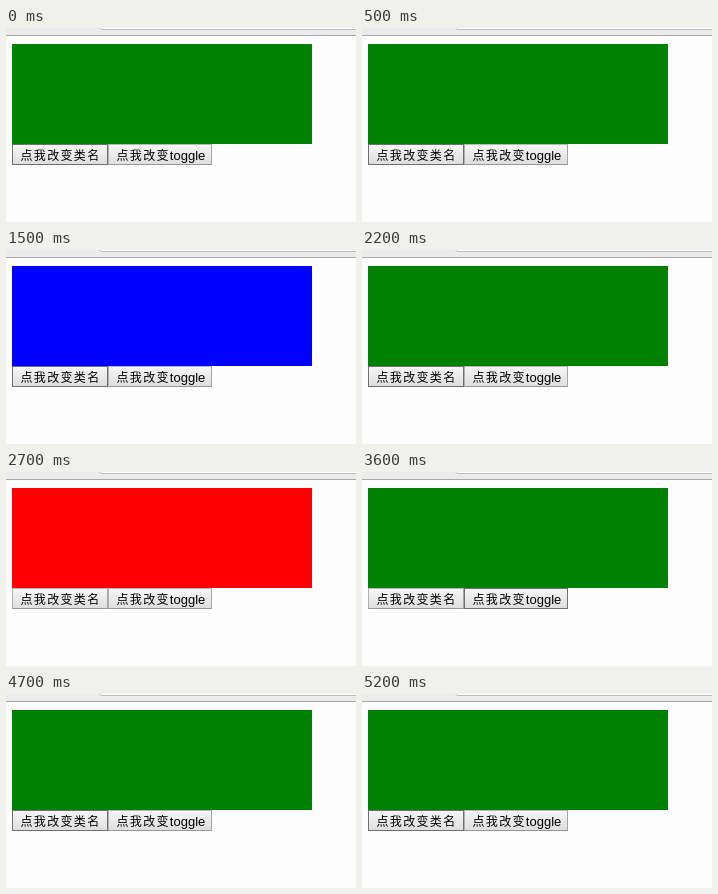
An HTML page for the animation above (5.7 s loop, 350 by 194 pixels).

```html
<!DOCTYPE html>
<html lang="zh-CN">
<head>
<meta charset="utf-8">
<title>Class toggle demo</title>
<style>
html, body { margin: 0; width: 100%; height: 100%; overflow: hidden; background: #fdfdfd; }
body { position: relative; }
div { position: absolute; box-sizing: border-box; }
.toolbar { left: 0; top: 0; width: 100%; height: 8px; overflow: hidden; background: #ebebeb; border-bottom: 1px solid #a9a9a9; }
.address { left: 93px; top: -10px; right: -9px; height: 12px; background: #fff; border: 1px solid #bcbcbc; border-radius: 3px; }
.box { left: 6px; top: 16px; width: 300px; height: 100px; background: #008000; }
.button {
  top: 116px; height: 21px; padding-left: 7.5px; border: 1px solid; border-color: #b8b8b8 #a6a6a6 #999 #b0b0b0;
  background: linear-gradient(#f6f6f6, #dedede); color: #000; white-space: nowrap; overflow: hidden;
  font: 300 12px/19px "Noto Sans CJK SC", "Noto Sans CJK", sans-serif; letter-spacing: 1.333px;
}
.button span { font: 13px/19px "Liberation Sans", sans-serif; letter-spacing: 0; }
.hover { border-color: #707070; }
.pressed { background: linear-gradient(#dcdcdc, #f2f2f2); }
#rename { left: 6px; width: 96px; }
#toggle { left: 102px; width: 104px; }
</style>
</head>
<body>
<div class="toolbar"><div class="address"></div></div>
<div class="box" id="box"></div>
<div class="button" id="rename">点我改变类名</div>
<div class="button" id="toggle">点我改变<span>toggle</span></div>
<script>
const LOOP = 5700;
const colors = { g: '#008000', b: '#0000ff', r: '#ff0000' };

// [start ms, box colour, pressed button: 0 none, 1 rename, 2 toggle]
const steps = [
  [0, 'g', 0], [300, 'g', 1], [400, 'b', 1], [500, 'g', 0],
  [1100, 'b', 1], [1300, 'g', 1], [1500, 'b', 0], [1700, 'g', 1],
  [2000, 'b', 0], [2100, 'b', 1], [2200, 'g', 0],
  [2400, 'g', 2], [2500, 'r', 0], [2600, 'r', 2], [2700, 'r', 0], [2800, 'r', 2], [2900, 'g', 0],
  [3000, 'g', 2], [3100, 'g', 0], [3200, 'g', 2],
  [3400, 'g', 0], [3500, 'g', 2], [3600, 'g', 0],
  [3900, 'g', 1], [4000, 'b', 0], [4100, 'b', 1], [4200, 'g', 1],
  [4400, 'b', 1], [4500, 'r', 1], [4700, 'g', 0],
  [5000, 'g', 1], [5100, 'b', 1], [5200, 'g', 0]
];

// [start ms, button under the pointer]
const hovers = [[0, 1], [2400, 0], [3000, 2], [3900, 1]];

const [box, ...buttons] = ['box', 'rename', 'toggle'].map(id => document.getElementById(id));
const start = performance.now();
const at = (table, time) => table.findLast(row => row[0] <= time);

function draw() {
  const time = (performance.now() - start) % LOOP;
  const [, color, pressed] = at(steps, time);
  const [, hovered] = at(hovers, time);
  box.style.background = colors[color];
  buttons.forEach((button, i) => {
    button.classList.toggle('pressed', pressed === i + 1);
    button.classList.toggle('hover', hovered === i + 1);
  });
  requestAnimationFrame(draw);
}
draw();
</script>
</body>
</html>
```
